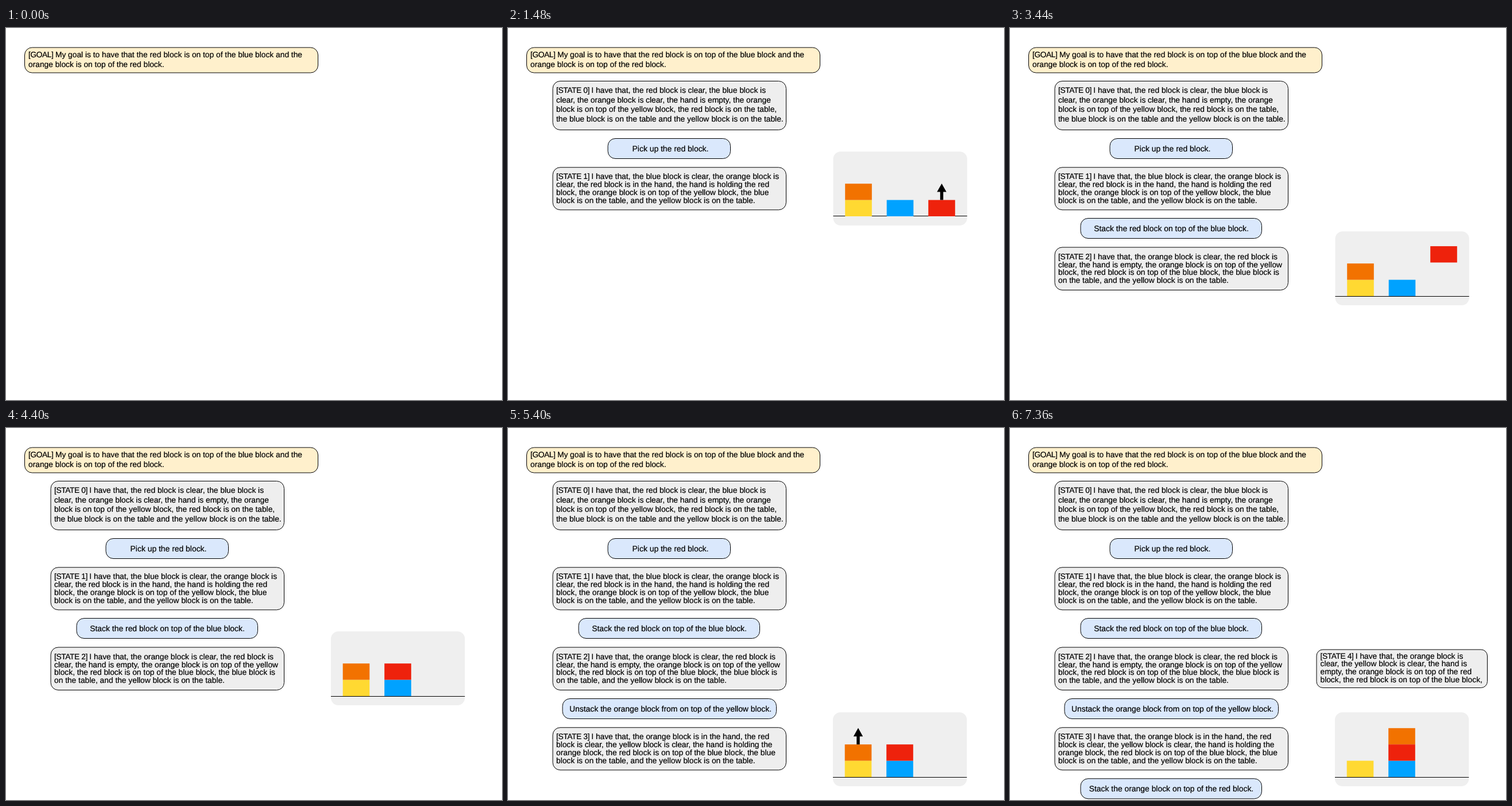
Animation of 864x648 px, one loop 7840 ms. Source, as an HTML page:

```html
<!DOCTYPE html>
<html lang="en">
<head>
<meta charset="utf-8">
<title>Stacking blocks</title>
<style>
  html, body { margin: 0; height: 100%; overflow: hidden; background: #fff; }
  svg { display: block; }
  text {
    font-family: "Liberation Sans", Arial, sans-serif;
    font-size: 13.78px;
    text-rendering: geometricPrecision;
    stroke: #000;
    stroke-width: .2px;
  }
  .action { font-size: 13.9px; text-anchor: middle; }
  .tag { letter-spacing: -.4px; }
</style>
</head>
<body>
<svg id="stage" width="864" height="648"></svg>
<script>
const LOOP = 7840;
const GREY = '#eee', SKY = '#dae8fc', CREAM = '#fff0cc';
const YELLOW = '#ffd932', ORANGE = '#f27200', BLUE = '#00a2ff', RED = '#ee220c';
const COL = 72.5, BLOCK_W = 46.6, BLOCK_H = 28.4;

const rect = (x, y, w, h, fill, more = '') =>
  `<rect x="${x}" y="${y}" width="${w}" height="${h}" fill="${fill}" ${more}/>`;

const bubble = (x, y, w, h, fill, r = 13) =>
  rect(x, y, w, h, fill, `rx="${r}" stroke="#000"`);

const lines = (x, y, step, rows) => rows.map((row, i) => {
  const body = row.replace(/^\[.*?\] /, '<tspan class="tag">$&</tspan>');
  return `<text x="${x}" y="${y + i * step}">${body}</text>`;
}).join('');

const state = (y, h, textY, step, rows) =>
  bubble(78, y, 406.5, h, GREY) + lines(84, textY, step, rows);

const action = (x, y, w, textX, text) =>
  bubble(x, y, w, 35, SKY) + `<text class="action" x="${textX}" y="${y + 22}">${text}</text>`;

// [start, markup]: each note stays until the loop ends
const notes = [
  [0, bubble(32.5, 34, 511, 44, CREAM) + lines(39, 51, 16.5, [
    '[GOAL] My goal is to have that the red block is on top of the blue block and the',
    'orange block is on top of the red block.'])],
  [520, state(92.5, 85, 113, 16.7, [
    '[STATE 0] I have that, the red block is clear, the blue block is',
    'clear, the orange block is clear, the hand is empty, the orange',
    'block is on top of the yellow block, the red block is on the table,',
    'the blue block is on the table and the yellow block is on the table.'])],
  [1000, action(174, 192.5, 213.5, 283, 'Pick up the red block.')],
  [1480, state(242.8, 74, 263.3, 13.8, [
    '[STATE 1] I have that, the blue block is clear, the orange block is',
    'clear, the red block is in the hand, the hand is holding the red',
    'block, the orange block is on top of the yellow block, the blue',
    'block is on the table, and the yellow block is on the table.'])],
  [2960, action(123, 331.5, 315.5, 281, 'Stack the red block on top of the blue block.')],
  [3440, state(382, 74.5, 402.8, 13.8, [
    '[STATE 2] I have that, the orange block is clear, the red block is',
    'clear, the hand is empty, the orange block is on top of the yellow',
    'block, the red block is on top of the blue block, the blue block is',
    'on the table, and the yellow block is on the table.'])],
  [4920, action(95, 471.5, 372.5, 283, 'Unstack the orange block from on top of the yellow block.')],
  [5400, state(521.8, 74, 542.4, 13.8, [
    '[STATE 3] I have that, the orange block is in the hand, the red',
    'block is clear, the yellow block is clear, the hand is holding the',
    'orange block, the red block is on top of the blue block, the blue',
    'block is on the table, and the yellow block is on the table.'])],
  [6360, action(123, 610.8, 315.5, 281, 'Stack the orange block on top of the red block.')],
  [6880, bubble(534, 386, 297.5, 66.5, GREY, 11) + lines(540.5, 401.5, 13.8, [
    '[STATE 4] I have that, the orange block is',
    'clear, the yellow block is clear, the hand is',
    'empty, the orange block is on top of the red',
    'block, the red block is on top of the blue block,'])],
];

// Where the scene stands: left edge, block base, table line
const places = [[566.5, 183, 182.5], [566.5, 328, 327.5], [566.5, 467, 467.5], [566, 467, 467.5], [566, 608, 608.5]];

// [start, place, orange [column, level], red [column, level], lifted block]
const scenes = [
  [520, 0, [0, 1], [2, 0]],
  [1480, 1, [0, 1], [2, 0], 'red'],
  [1960, 1, [0, 1], [2, 1.04], 'red'],
  [2440, 1, [0, 1], [2, 2.06], 'red'],
  [2960, 1, [0, 1], [2, 2.06]],
  [3440, 2, [0, 1], [2, 2.06]],
  [3920, 2, [0, 1], [1, 2.06]],
  [4400, 3, [0, 1], [1, 1]],
  [5400, 4, [0, 1], [1, 1], 'orange'],
  [5880, 4, [0, 2.03], [1, 1], 'orange'],
  [6360, 4, [0, 2.03], [1, 1]],
  [7360, 4, [1, 2], [1, 1]],
];

function drawScene([, place, orange, red, lifted]) {
  const [x, base, table] = places[place];
  const left = col => x + 20.7 + col * COL;
  const top = level => base - (level + 1) * BLOCK_H;
  const block = ([col, level], fill) => rect(left(col), top(level), BLOCK_W, BLOCK_H, fill);
  const arrow = ([col, level]) =>
    `<path transform="translate(${left(col) + BLOCK_W / 2} ${top(level)})"
      d="M0-28.6L8.2-14H2.7V0H-2.7V-14H-8.2Z"/>`;
  return rect(x, base - 112.7, 233.3, 128.7, '#efefef', 'rx="13"') +
    `<path d="M${x} ${table}h233.3" stroke="#000"/>` +
    block([0, 0], YELLOW) + block([1, 0], BLUE) + block(orange, ORANGE) + block(red, RED) +
    (lifted ? arrow(lifted === 'red' ? red : orange) : '');
}

const stage = document.getElementById('stage');
let shown = '';

function frame(now) {
  const t = now % LOOP;
  const started = ([start]) => start <= t;
  const scene = scenes.filter(started).pop();
  const markup = notes.filter(started).map(note => note[1]).join('') + (scene ? drawScene(scene) : '');
  if (markup !== shown) stage.innerHTML = shown = markup;
  requestAnimationFrame(frame);
}
frame(0);
</script>
</body>
</html>
```
